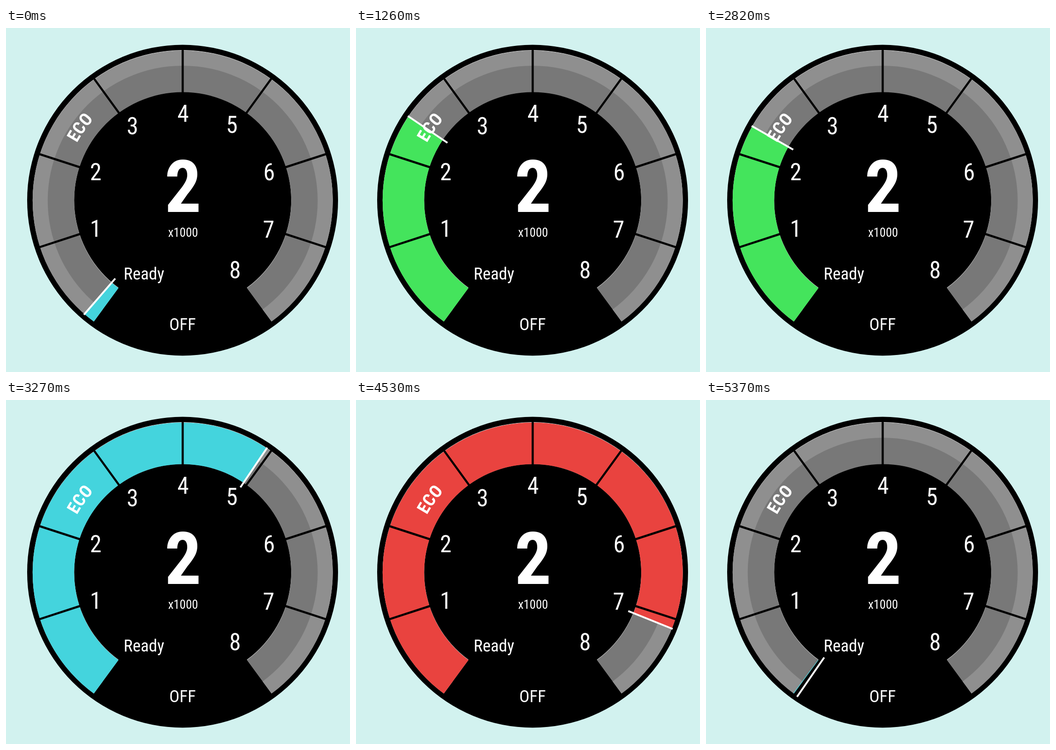
Write an HTML page that moves like this. It is 748x748 px and loops after 5490 ms.

```html
<!DOCTYPE html>
<html lang="en">
<head>
<meta charset="utf-8">
<title>Tachometer</title>
<style>
  html, body { margin: 0; width: 100%; height: 100%; overflow: hidden; background: #d2f2ef; }
  svg { display: block; width: 100vw; height: 100vh; }
  text {
    fill: #fff;
    text-anchor: middle;
    font-family: "Noto Sans Condensed", "Roboto Condensed", "Noto Sans", "Open Sans", sans-serif;
    font-stretch: condensed;
  }
</style>
</head>
<body>
<svg viewBox="0 0 748 748">
  <circle cx="384" cy="374.5" r="338"/>
  <path id="backing" fill="#e4e4e4" transform="translate(0 -1)"/>
  <path id="track" fill="#787878"/>
  <path id="rim" fill="#8f8f8f"/>
  <path id="fill"/>
  <path id="dividers" stroke="#000" stroke-width="4.6"/>
  <path id="ecoArc" fill="none"/>
  <text font-size="38" font-weight="600"><textPath href="#ecoArc" startOffset="50%">ECO</textPath></text>
  <g font-size="51">
    <text x="195" y="454">1</text>
    <text x="195" y="331">2</text>
    <text x="275" y="231">3</text>
    <text x="385" y="204">4</text>
    <text x="491" y="228">5</text>
    <text x="572" y="331">6</text>
    <text x="571" y="456">7</text>
    <text x="498" y="544">8</text>
  </g>
  <text x="385" y="400" font-size="158" font-weight="700">2</text>
  <text x="385" y="454" font-size="27">x1000</text>
  <text x="300" y="547" font-size="37">Ready</text>
  <text x="384" y="657" font-size="37">OFF</text>
  <path id="needle" stroke="#fff" stroke-width="4"/>
</svg>
<script>
const LOOP = 5490, LAST = 5370, STEP = 30;
const START = 36.3, END = 360 - START, SEGMENT = 36;
const INNER = 236, MIDDLE = 293.5, OUTER = 326.3;
const CYAN = '#44d4dd', GREEN = '#44e45c', RED = '#e9433f';

// Turning points of the needle: time in ms, angle in degrees.
const KEYS = [
  [0, 40.9], [600, 91], [1140, 117.5], [1600, 138.5], [1920, 99.7], [2350, 91],
  [2820, 119.7], [3420, 229.5], [3750, 231.2], [3990, 259], [4530, 291.9], [LAST, 34.6]
];

const set = (id, name, value) => document.getElementById(id).setAttribute(name, value);

// Angles run clockwise from straight down.
function polar(r, deg) {
  const a = deg * Math.PI / 180;
  return [384.2 - r * Math.sin(a), 375.4 + r * Math.cos(a)];
}

const spoke = (r0, r1, deg) => `M${polar(r0, deg)}L${polar(r1, deg)}`;

function sector(r0, r1, from, to) {
  const large = to - from > 180 ? 1 : 0;
  return `M${polar(r1, from)}A${r1} ${r1} 0 ${large} 1 ${polar(r1, to)}` +
    `L${polar(r0, to)}A${r0} ${r0} 0 ${large} 0 ${polar(r0, from)}Z`;
}

function drawDial() {
  set('backing', 'd', sector(INNER, OUTER, START, END));
  set('track', 'd', sector(INNER, OUTER, START, END));
  set('rim', 'd', sector(MIDDLE, OUTER, START, END));
  set('ecoArc', 'd', `M${polar(262, 95)}A262 262 0 0 1 ${polar(262, 156)}`);
  let spokes = '';
  for (let n = 2; n <= 8; n++) spokes += spoke(231, 329, n * SEGMENT);
  set('dividers', 'd', spokes);
}

const secant = i => (KEYS[i + 1][1] - KEYS[i][1]) / (KEYS[i + 1][0] - KEYS[i][0]);

function slope(i) {
  if (i === 0) return secant(0);
  if (i === KEYS.length - 1) return 0;
  const a = secant(i - 1), b = secant(i);
  return a * b <= 0 ? 0 : 2 * a * b / (a + b);
}

// Monotone cubic: smooth, and it never overshoots a turning point.
function angleAt(t) {
  let i = 0;
  while (i < KEYS.length - 2 && t >= KEYS[i + 1][0]) i++;
  const [t0, a0] = KEYS[i], [t1, a1] = KEYS[i + 1];
  const span = t1 - t0, u = (t - t0) / span, v = 1 - u;
  return a0 * v * v * (1 + 2 * u) + a1 * u * u * (1 + 2 * v) +
    span * u * v * (slope(i) * v - slope(i + 1) * u);
}

function colorAt(angle) {
  if (angle >= 7 * SEGMENT) return RED;
  return angle >= 3 * SEGMENT && angle < 4 * SEGMENT ? GREEN : CYAN;
}

function draw(ms) {
  const t = Math.min(LAST, Math.floor((ms % LOOP) / STEP) * STEP);
  const angle = angleAt(t);
  set('fill', 'd', sector(INNER, OUTER, START, Math.max(START + .25, angle)));
  set('fill', 'fill', colorAt(angle));
  set('needle', 'd', spoke(224, 328, angle));
}

const begin = performance.now();
function tick() {
  draw(performance.now() - begin);
  requestAnimationFrame(tick);
}
drawDial();
tick();
</script>
</body>
</html>
```
